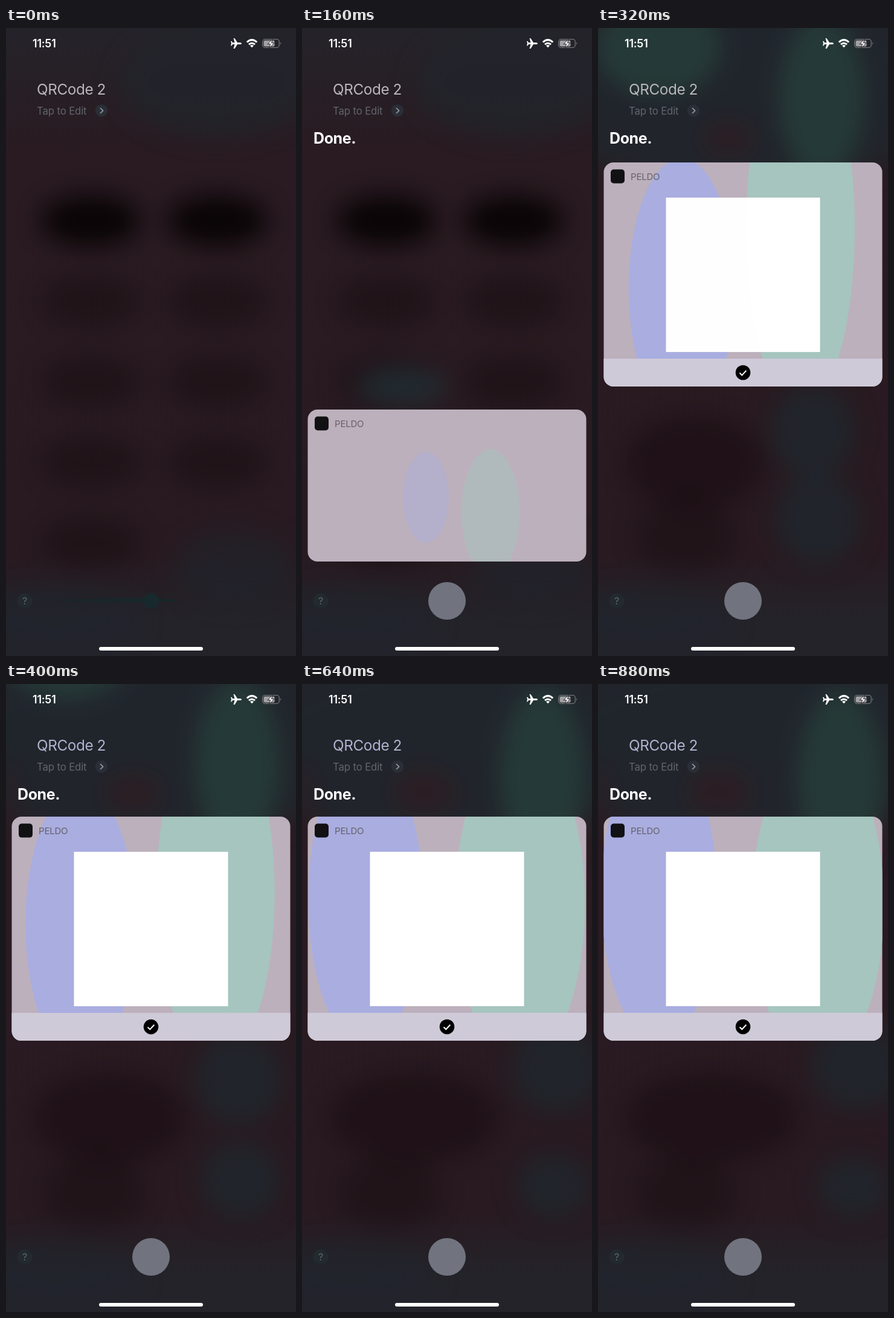
An HTML page that plays this animation: 480 px wide and 1037 px high, repeating every 0.96 s.

```html
<!DOCTYPE html>
<html lang="en">
<head>
<meta charset="utf-8">
<title>Assistant result card</title>
<style>
html, body { margin: 0; width: 100%; height: 100%; overflow: hidden; background: #271b21; }
svg { display: block; width: 100%; height: 100%; }
text { font-family: Inter, Roboto, sans-serif; }
</style>
</head>
<body>
<svg viewBox="0 0 480 1037" preserveAspectRatio="none">
  <defs>
    <linearGradient id="wall" x2="0" y2="1">
      <stop offset="0" stop-color="#25232a"/>
      <stop offset=".2" stop-color="#291b21"/>
      <stop offset=".84" stop-color="#281a20"/>
      <stop offset=".94" stop-color="#24232a"/>
    </linearGradient>
    <filter id="soft" filterUnits="userSpaceOnUse" x="-100" y="-100" width="680" height="1240" color-interpolation-filters="sRGB">
      <feGaussianBlur stdDeviation="19"/>
    </filter>
    <clipPath id="cardClip"><rect id="cardShape" x="9.5" width="461" rx="16"/></clipPath>
  </defs>

  <rect width="480" height="1037" fill="url(#wall)"/>
  <g id="glow" filter="url(#soft)"></g>

  <g fill="#fff">
    <text x="44" y="32" font-size="18" font-weight="600" letter-spacing="-.2">11:51</text>
    <path d="M390 25.5C390 24.5 388.500 24 387 24H383L378.500 17H376.500L378.500 24H375L373.500 21.800H372L373 25.500L372 29.200H373.500L375 27H378.500L376.500 34H378.500L383 27H387C388.500 27 390 26.500 390 25.500Z"/>
    <path d="M398.800 23.400Q407 15.800 415.200 23.400M402 27.200Q407 22.800 412 27.200" fill="none" stroke="#fff" stroke-width="3"/>
    <path d="M404 29.200Q407 27 410 29.200L407 32.300Z"/>
    <rect x="424.700" y="18.700" width="27.500" height="13.600" rx="4" fill="none" stroke="#77757a" stroke-width="1.300"/>
    <path d="M454 23v5q2-2.500 0-5Z" fill="#77757a"/>
    <rect x="426.500" y="20.500" width="18" height="10" rx="2.300" fill="#a3a1a5"/>
    <path d="M441 18.500L433 26.500H437.500L436 33L444 24.700H439.500Z" stroke="#28252b"/>
    <rect x="154" y="1022" width="172" height="6" rx="3"/>
  </g>

  <text id="heading" x="51" y="110" font-size="24.300" letter-spacing="-.4">QRCode 2</text>
  <text x="51" y="142.500" font-size="16.700" letter-spacing="-.1" fill="#62656d">Tap to Edit</text>
  <circle cx="158" cy="136.500" r="10.300" fill="#2a2e36"/>
  <path d="M156 132l4.500 4.500-4.500 4.500" fill="none" stroke="#9a9ba0" stroke-width="1.700"/>
  <text id="reply" x="19" y="191" font-size="25" font-weight="700" letter-spacing="-.4" fill="#fff">Done.</text>

  <g id="card" clip-path="url(#cardClip)">
    <rect x="9" y="200" width="462" height="700" fill="#bcb0bc"/>
    <g id="tint"></g>
    <g id="content">
      <rect x="21" y="11.500" width="23" height="23" rx="5" fill="#111114"/>
      <text x="54" y="29" font-size="15" letter-spacing="-.2" fill="#66616a">PELDO</text>
      <rect id="panel" x="112.500" y="58" width="255" height="255" fill="#fff"/>
      <rect x="9" y="324" width="462" height="60" fill="#cfcad8"/>
      <circle cx="240" cy="347" r="12.300"/>
      <path d="M234.500 347.500l3.800 3.800 7-7.600" fill="none" stroke="#fff" stroke-width="2"/>
    </g>
  </g>

  <circle cx="31" cy="946" r="12.500" fill="#222a2f"/>
  <text x="31" y="951.500" font-size="16" text-anchor="middle" fill="#62686c">?</text>
  <path id="wave" d="M75 945Q240 937 287 945Q240 953 75 945Z" fill="#19262a"/>
  <circle id="orb" cx="240" cy="946"/>
</svg>

<script>
const STEP = 80, STEPS = 12;
const CARD_STEP = 2, GLOW_STEP = 3, LAST = STEPS - 1;
const CARD_TOP = 219, CARD_RISE = 411, CARD_HEIGHT = 370, SCREEN_BOTTOM = 881;

const DARK = "#12070b", COOL = "#21262d", GREEN = "#263e3a", WINE = "#321a21";
const VIOLET = "#a9ade0", MINT = "#a6c5bf";

const $ = id => document.getElementById(id);
const set = (el, attrs) => {
  for (const name in attrs) el.setAttribute(name, attrs[name]);
};
const show = (el, visible) => { el.style.display = visible ? "" : "none"; };

// Share of the way travelled, a number of steps after the start
const drift = steps => 1 - Math.exp(-.5 * steps);
const spring = steps => 1 - Math.exp(-1.95 * steps ** 1.33);

// An ellipse [cx, cy, rx, ry] that drifts to its resting place
const blobs = [];
function blob(layer, fill, opacity, first, last, from, to = from) {
  const el = document.createElementNS("http://www.w3.org/2000/svg", "ellipse");
  set(el, { fill, opacity });
  $(layer).append(el);
  blobs.push({ el, first, last, from, to });
}

// Blurred wallpaper before the reply: two columns of dark tiles
blob("glow", COOL, .7, 0, CARD_STEP, [350, 90, 160, 90]);
blob("glow", COOL, .6, 0, CARD_STEP, [380, 890, 100, 60]);
for (let row = 0; row < 5; row++) {
  for (const x of row < 4 ? [140, 350] : [140]) {
    blob("glow", row ? DARK : "#050203", row ? .33 : .85, 0, CARD_STEP, [x, 318 + 133 * row, 82, 42]);
  }
}
blob("glow", "#222e33", .9, CARD_STEP, CARD_STEP, [165, 592, 75, 30]);

// Colours drifting behind the glass afterwards
blob("glow", COOL, .9, GLOW_STEP, LAST, [240, 110, 330, 160]);
blob("glow", COOL, .6, 0, LAST, [80, 980, 140, 55]);
blob("glow", DARK, .4, GLOW_STEP, LAST, [140, 720, 95, 80], [190, 715, 145, 75]);
blob("glow", DARK, .3, GLOW_STEP, LAST, [145, 840, 85, 60]);
blob("glow", COOL, .9, GLOW_STEP, LAST, [305, 690, 65, 80], [432, 630, 75, 72]);
blob("glow", COOL, .9, GLOW_STEP, LAST, [325, 800, 75, 90], [425, 832, 60, 50]);
blob("glow", GREEN, .9, GLOW_STEP, LAST, [100, 150, 105, 105], [100, -150, 100, 40]);
blob("glow", GREEN, .9, GLOW_STEP, LAST, [350, 85, 70, 125], [402, 160, 70, 148]);
blob("glow", WINE, .6, GLOW_STEP + 1, LAST, [215, 182, 45, 28], [200, 178, 56, 38]);
blob("glow", WINE, .4, GLOW_STEP + 2, LAST, [0, 182, 25, 52]);

// Flat colours seen through the card
blob("tint", MINT, .5, CARD_STEP, CARD_STEP, [312, 800, 48, 105]);
blob("tint", VIOLET, .4, CARD_STEP, CARD_STEP, [205, 775, 38, 75]);
blob("tint", MINT, 1, GLOW_STEP, GLOW_STEP, [208, 290, 201, 138]);
blob("tint", MINT, 1, GLOW_STEP + 1, LAST, [335, 330, 90, 300], [365, 367, 110, 260]);
blob("tint", VIOLET, 1, GLOW_STEP, LAST, [163, 485, 82, 195], [100, 345, 96, 245]);

function draw(step) {
  for (const { el, first, last, from, to } of blobs) {
    const way = drift(step - first);
    const [cx, cy, rx, ry] = from.map((v, i) => v + (to[i] - v) * way);
    show(el, step >= first && step <= last);
    set(el, { cx, cy, rx, ry });
  }

  const rise = spring(Math.max(0, step - CARD_STEP));
  const y = CARD_TOP + CARD_RISE * (1 - rise);
  set($("cardShape"), { y, height: Math.min(CARD_HEIGHT, SCREEN_BOTTOM - y) });
  set($("content"), { transform: `translate(0 ${y})` });
  set($("panel"), { opacity: rise });
  show($("card"), step >= CARD_STEP);
  show($("reply"), step >= CARD_STEP);

  set($("orb"), { r: Math.min(31, 13 + 9 * step), fill: step ? "#71747e" : "#18292d" });
  show($("wave"), step === 0);
  set($("heading"), { fill: step > GLOW_STEP + 1 ? "#b3b2d0" : "#bab6bc" });
}

let shown = -1;
function tick() {
  const step = Math.floor(performance.now() / STEP) % STEPS;
  if (step !== shown) draw(shown = step);
  requestAnimationFrame(tick);
}
tick();
</script>
</body>
</html>
```
